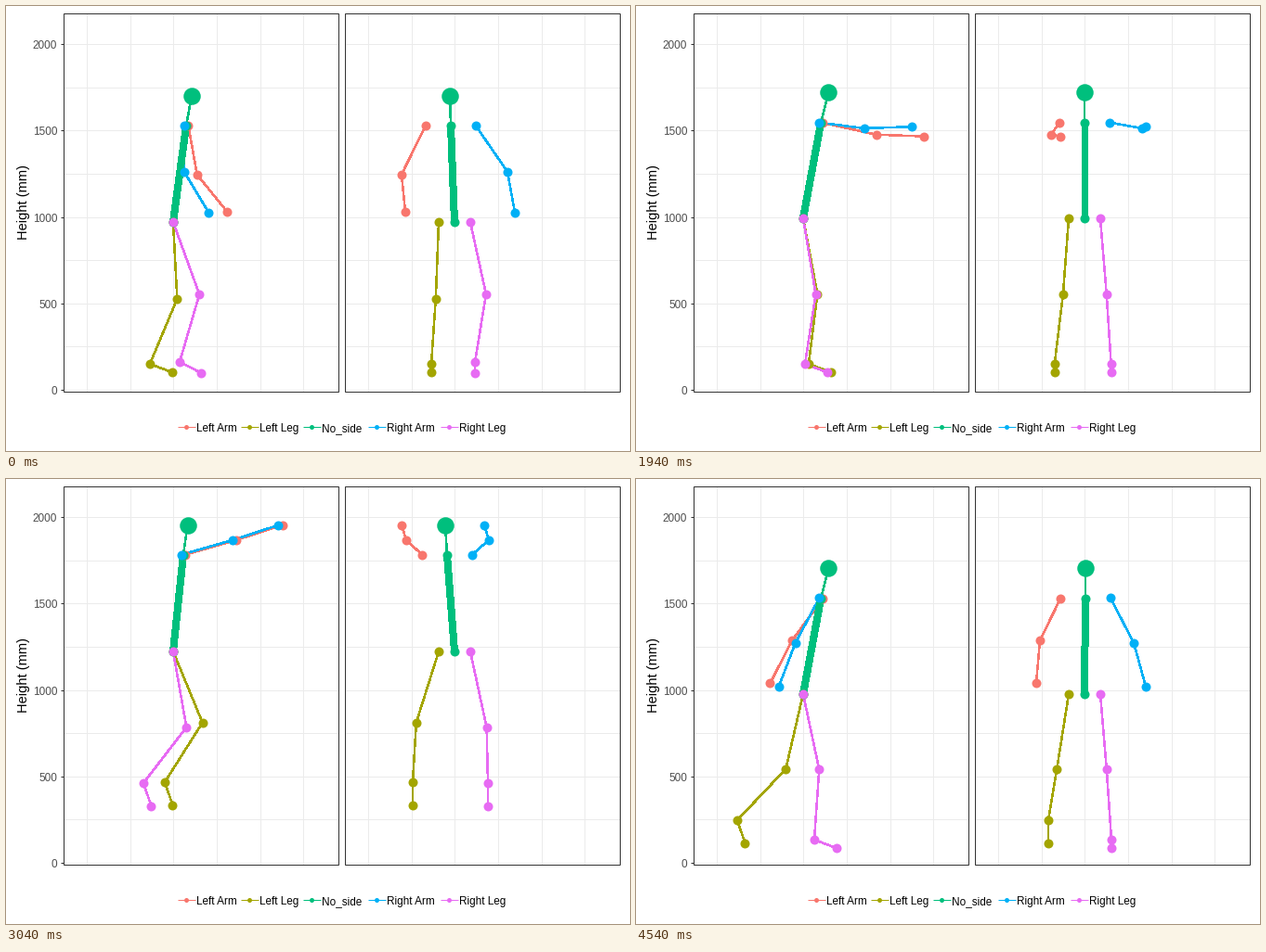
A matplotlib script that plays this animation: 672 px wide and 480 px high, repeating every 4.56 s.

```python
import numpy as np
import matplotlib.pyplot as plt
from matplotlib.animation import FuncAnimation
from matplotlib.patches import Rectangle

plt.rcParams["font.family"] = "Liberation Sans"

W, H = 672, 480
STEP, FRAMES = 20, 228
PX = 0.75  # points per pixel at 96 dpi
COLORS = {"LA": "#F8766D", "LL": "#A3A500", "No": "#00BF7D",
          "RA": "#00B0F6", "RL": "#E76BF3"}

# ---------- timing: moments of the movement, in seconds ----------
EVENTS = dict(start=0, walk=0.54, reach=1.06, high=1.58, fore=1.94, dip=2.15,
              back=2.3, low=2.46, drive=2.69, off=2.84, kick=2.94, apex=3.04,
              land=3.24, sink=3.5, split=3.92, rise=4.24, end=4.54)
T = np.arange(FRAMES) * STEP / 1000


def curve(**keys):
    """Smooth cubic through values at named events, never overshooting them."""
    t = np.array([EVENTS[k] for k in keys])
    v = np.array(list(keys.values()), float)
    h = np.diff(t)
    d = np.diff(v) / h
    a, b = d[:-1], d[1:]
    mean = (a * h[1:] + b * h[:-1]) / (h[:-1] + h[1:])
    limit = 2 * np.minimum(abs(a), abs(b))
    m = np.empty_like(v)
    m[0], m[-1] = d[0], d[-1]
    m[1:-1] = np.where(a * b > 0, np.clip(mean, -limit, limit), 0)
    i = np.clip(np.searchsorted(t, T, "right") - 1, 0, len(h) - 1)
    s = (T - t[i]) / h[i]
    return (v[i] * (1 + 2 * s) * (1 - s) ** 2 + v[i + 1] * s * s * (3 - 2 * s)
            + h[i] * (m[i] * s * (1 - s) ** 2 - m[i + 1] * s * s * (1 - s)))


# ---------- body: pixel lengths, angles in degrees ----------
HIP_X, MID_X, GROUND = 180, 483, 386
UPPER_ARM, FOREARM = 60, 52
THIGH, SHANK, FOOT = 83, 76, 26

hip_y = curve(start=233, walk=229, reach=227, high=227, fore=229, dip=238, back=255,
              low=285, drive=266, off=222, apex=186, land=222, sink=295, split=288,
              rise=240, end=232)
lean = np.radians(curve(start=7.7, reach=-8.3, high=-9, fore=10.5, dip=36, back=55,
                        low=57, drive=33, off=6, apex=6, land=14, sink=44, split=37,
                        end=10.5))
sway = curve(start=-4, fore=0, back=-4, apex=-8, split=-2, end=1)

# both arms swing together; 'apart' separates left from right
swing = curve(start=5, walk=15, reach=131, high=190, fore=80, back=-111, low=-98,
              drive=5, off=98, apex=106, sink=50, split=12, end=-32)
apart = curve(start=5, reach=-3, back=-2, apex=0, split=57, end=-4)
bend = curve(start=30, reach=8, fore=10, back=18, apex=2, split=6, end=8)


def point(x, y, front):
    return np.array(np.broadcast_arrays(x, y, front, T)[:3], float)


def arm(side, elbow_out, wrist_out):
    x, y, front = neck
    x = x + side * (2 + 0.05 * apart)
    y = y - side * 0.07 * apart
    front = front - side * 27
    joints = [point(x, y, front)]
    angle = swing + side * apart
    fold = bend - side * 0.2 * apart
    for length, out, turn in ((UPPER_ARM, elbow_out, 0), (FOREARM, wrist_out, fold)):
        seen = np.sqrt(length ** 2 - out ** 2)  # what the side view shows
        a = np.radians(angle + turn)
        x, y, front = x + seen * np.sin(a), y + seen * np.cos(a), front - side * out
        joints.append(point(x, y, front))
    return joints


def leg(side, step, lift, stance, flare):
    """Knee solved from hip and ankle; the foot points down as it lifts."""
    dx, dy = step, GROUND - lift - hip_y
    dist = np.hypot(dx, dy)
    ux, uy = dx / dist, dy / dist
    reach = np.minimum(dist, THIGH + SHANK)
    along = (THIGH ** 2 - SHANK ** 2 + reach ** 2) / (2 * reach)
    out = np.sqrt(np.maximum(THIGH ** 2 - along ** 2, 0))
    ankle = point(HIP_X + dx, hip_y + dy, MID_X - side * stance)
    pitch = np.radians(21 + np.clip(3 * lift, 0, 50))
    return [point(HIP_X, hip_y, MID_X - side * 17),
            point(HIP_X + along * ux + out * uy, hip_y + along * uy - out * ux,
                  MID_X - side * (17 + 0.4 * (stance - 17) + flare)),
            ankle,
            ankle + point(FOOT * np.cos(pitch), FOOT * np.sin(pitch), 0)]


bow = np.sin(lean)
torso, nape = 105 - 20 * bow ** 4, 31 + 13 * np.maximum(bow, 0)
neck = point(HIP_X + torso * bow, hip_y - torso * np.cos(lean), MID_X + sway)
head = neck + point(nape * np.sin(1.35 * lean), -nape * np.cos(1.35 * lean), 0.25 * sway)

body = {
    "LA": arm(1, curve(start=26, reach=12, fore=9, back=22, apex=17, split=6, end=22),
              curve(start=-4, reach=-21, fore=-10, back=-10, apex=5, split=-25, end=4)),
    "LL": leg(1, curve(start=-25, walk=-10, reach=-11, fore=6, back=14, low=14, off=-22,
                       kick=-50, apex=-9, land=44, split=30, end=-71),
              curve(start=0, drive=0, off=14, kick=70, apex=59, land=16, sink=0,
                    rise=3, end=18),
              curve(start=25, reach=33, back=32, apex=45, split=33, end=39),
              curve(start=0, fore=0, apex=13, split=0, end=4)),
    "No": [head, neck, point(HIP_X, hip_y, MID_X)],
    "RA": arm(-1, curve(start=34, fore=35, back=14, apex=18, sink=50, split=38, end=25),
              curve(start=8, reach=-6, fore=4, back=-9, apex=-5, sink=44, split=27, end=13)),
    "RL": leg(-1, curve(start=7, walk=-10, reach=-14, fore=2, back=17, low=17, off=-24,
                        kick=-78, apex=-32, land=34, sink=28, split=-7, end=12),
              curve(start=2, reach=0, drive=0, off=14, kick=76, apex=58, land=14, sink=3,
                    split=6, end=-3),
              curve(start=22, reach=28, back=29, apex=36, split=51, end=29),
              curve(start=15, reach=3, back=2, apex=10, split=18, end=2)),
}
body = {k: np.array(joints) for k, joints in body.items()}  # joint, axis, frame

# ---------- static chart ----------
fig = plt.figure(figsize=(W / 96, H / 96), dpi=96, facecolor="white")
ax = fig.add_axes([0, 0, 1, 1])
ax.set_xlim(0, W)
ax.set_ylim(H, 0)
ax.axis("off")


def rule(x, y, color):
    ax.plot(x, y, color=color, lw=PX, solid_capstyle="butt", zorder=1)


def label(x, y, text, size=11.73, **kw):
    ax.text(x, y, text, fontsize=size * PX, va="baseline", **kw)


TOP, BOTTOM, WIDTH = 8, 416, 296
PER_MM = 0.1863
grid_y = [round(413.9 - PER_MM * mm) for mm in range(0, 2001, 250)]
for left in (62, 365):
    for i in range(6):
        x = left + round(25.2 + 46.6 * i)
        rule([x, x], [TOP, BOTTOM], "#EBEBEB")
    for y in grid_y:
        rule([left, left + WIDTH], [y, y], "#EBEBEB")
    ax.add_patch(Rectangle((left, TOP), WIDTH, BOTTOM - TOP, fill=False,
                           ec="#333333", lw=PX, zorder=8))

for i, y in enumerate(grid_y[::2]):
    rule([59, 62], [y, y], "#333333")
    label(55.3, y + 4.8, str(500 * i), color="#4D4D4D", ha="right")
label(22.7, 212, "Height (mm)", 14.67, rotation=90, rotation_mode="anchor", ha="center")

names = ("Left Arm", "Left Leg", "No_side", "Right Arm", "Right Leg")
for color, x, text in zip(COLORS.values(), (194, 262, 329, 399, 477), names):
    rule([x - 9, x + 10], [454, 454], color)
    ax.plot(x, 454, "o", ms=5 * PX, mew=0, color=color)
    label(x + 10.6, 458.7, text, color="black")


# ---------- moving figure ----------
def line(color, width):
    return ax.plot([], [], color=color, lw=width * PX, zorder=3, antialiased=False,
                   solid_capstyle="butt", solid_joinstyle="round")[0]


def dots(color, size):
    return ax.plot([], [], "o", color=color, ms=size * PX, mew=0, zorder=5,
                   antialiased=False)[0]


# each part: artist, limb, visible joints, horizontal axis
parts = []
for axis in (0, 2):
    for limb, color in COLORS.items():
        parts.append((line(color, 1.5), limb, slice(None), axis))
        parts.append((dots(color, 10), limb, slice(None), axis))
    parts.append((line(COLORS["No"], 7), "No", slice(1, 3), axis))
    parts.append((dots(COLORS["No"], 18.5), "No", slice(0, 1), axis))


def draw(n):
    for artist, limb, joints, axis in parts:
        pts = body[limb][joints, :, n]
        artist.set_data(pts[:, axis], pts[:, 1])
    return [part[0] for part in parts]


anim = FuncAnimation(fig, draw, frames=FRAMES, interval=STEP, repeat=True, repeat_delay=0)
plt.show()
```
